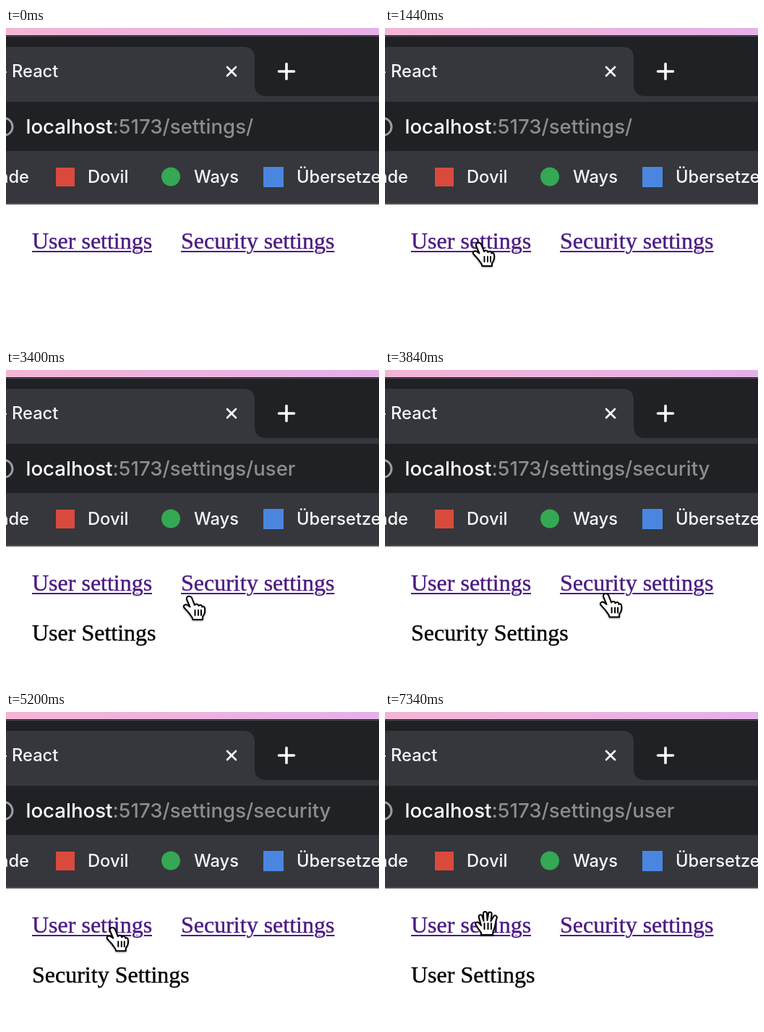
An HTML page that plays this animation: 516x434 px, repeating every 7400 ms.

```html
<!DOCTYPE html>
<html lang="de">
<head>
<meta charset="utf-8">
<title>Settings</title>
<style>
  html, body { margin: 0; width: 100%; height: 100%; overflow: hidden; background: #fff; }
  svg { display: block; }
  .ui { font: 500 23.7px Inter, sans-serif; fill: #f4f5f6; }
  .url { font-size: 27.6px; fill: #fff; }
  .page { font: 32px "Liberation Serif", serif; stroke: #000; stroke-width: .4; }
  .halo { fill: #fff; stroke: #fff; stroke-width: 4; }
  .link { fill: #4b1b82; stroke: #4b1b82; }
  .bar { fill: #35373c; }
  .dark { fill: #202124; }
  .hand { fill: #fff; stroke: #000; stroke-width: 2; stroke-linejoin: round; stroke-linecap: round; }
  #cursor { filter: drop-shadow(0 1px 1px #0006); }
</style>
</head>
<body>
<svg width="516" height="434" viewBox="0 0 516 434">
  <defs>
    <linearGradient id="sky">
      <stop stop-color="#f4b5d5"/>
      <stop offset="1" stop-color="#e4b1e8"/>
    </linearGradient>
    <g id="links">
      <text x="36" y="305">User settings</text>
      <text x="242" y="305">Security settings</text>
    </g>
  </defs>

  <!-- browser window -->
  <rect width="516" height="10" fill="url(#sky)"/>
  <rect class="dark" y="10" width="516" height="160"/>
  <rect y="10" width="516" height="1" fill="#1a1218"/>
  <rect y="11" width="516" height="1" fill="#56545a"/>
  <path class="bar" d="M0 26H328Q344 26 344 42V78Q344 94 360 94H516V102H0Z"/>
  <rect class="bar" y="170" width="516" height="73"/>
  <rect y="242" width="516" height="2" fill="#5c5454"/>
  <path d="M306 54l12 12m0-12l-12 12" stroke="#fff" stroke-width="2.6" stroke-linecap="round"/>
  <path d="M377.5 60h21M388 49.5v21" stroke="#fff" stroke-width="3.6" stroke-linecap="round"/>
  <circle cx="-3" cy="136.5" r="12" fill="none" stroke="#9a9da1" stroke-width="3"/>

  <g class="ui">
    <rect y="60" width="1" height="2"/>
    <text x="8" y="68">React</text>
    <text class="url" x="27.5" y="146">localhost<tspan fill="#8b8d91">:5173/settings/<tspan id="route"></tspan></tspan></text>
    <text x="32" y="214" text-anchor="end">nde</text>
    <rect x="69" y="193" width="26" height="26" fill="#d94a3d"/>
    <text x="113" y="214">Dovil</text>
    <circle cx="228" cy="205.5" r="13" fill="#34a853"/>
    <text x="260" y="214">Ways</text>
    <rect x="356" y="192" width="28" height="28" fill="#4a86e0"/>
    <text x="402" y="214">Übersetzen</text>
  </g>

  <!-- page: the halo opens the underline around descenders -->
  <path d="M36 309H202M242 309H454.5" stroke="#4b1b82" stroke-width="2"/>
  <g class="page">
    <use href="#links" class="halo"/>
    <use href="#links" class="link"/>
    <text id="heading" x="36" y="374"></text>
  </g>

  <!-- cursors, each with its hot spot at the origin -->
  <g id="cursor">
    <path id="arrow" d="M0 0V29L7 23L12 34L17 32L12 21H21Z" stroke="#fff" stroke-width="2"/>
    <g id="pointer" class="hand">
      <path d="M-4 4C-5-1 1.5-1.5 3 2L7 12C8 10 12 10 12.5 13C14 11 17 11 17.5 14.5C19 13 21 14 21 17C22 22 20.500 25 18 28V32H4.500L3.500 29C1 25-3 20-7.500 15.500C-9.500 12.500-6 10-3 12L.5 14.500Z"/>
      <path d="M7.500 19v7m4.500-7v7m4-7v7" fill="none"/>
    </g>
    <g id="palm" class="hand">
      <path d="M-8 16V13C-11 9-13 6-15.500 2C-17-1-13-3-10.500 0L-8 3L-11-8C-12-12-7.500-13-6.500-9.500L-4.500-3L-5-13C-5-17 0-17 0-13L.5-4L2-13C2.500-16.500 7-16 6.500-12.500L5.500-3L9-9C10.500-12 15-10.500 13.500-7C11 0 12 6 8.500 11L8 16Z"/>
      <path d="M-3.500 0v8m5-8v8m4.500-8v8" fill="none"/>
    </g>
  </g>
</svg>
<script>
const LOOP = 7400, ENTER = 520, GRAB = 7340;

// time, x, y of the cursor
const track = [
  [520, 160, 434], [1240, 130, 299], [1440, 130, 297], [2000, 130, 291],
  [2920, 130, 291], [3400, 254, 313], [3640, 298, 311], [4120, 311, 308],
  [4520, 311, 308], [4680, 314.5, 306.5], [4960, 225, 322], [5240, 144, 296],
  [5560, 139.5, 291], [7340, 139.5, 291], [7400, 139.5, 291]
];
const visits = [[0, ''], [2160, 'user'], [3720, 'security'], [5880, 'user']];
const linkSpans = [[36, 202], [242, 455]];

const el = id => document.getElementById(id);
const show = (id, on) => el(id).setAttribute('visibility', on ? 'visible' : 'hidden');

const slope = (i, k) => (track[i + 1][k] - track[i][k]) / (track[i + 1][0] - track[i][0]);

// Tangent that never overshoots: zero at turning points and rests
function tangent(i, k) {
  if (i === 0 || i === track.length - 1) return 0;
  const a = slope(i - 1, k), b = slope(i, k);
  return a * b > 0 ? 2 * a * b / (a + b) : 0;
}

function position(t, k) {
  const i = Math.max(0, track.findIndex(p => p[0] > t) - 1);
  const p = track[i], q = track[i + 1], span = q[0] - p[0];
  const u = Math.max(0, (t - p[0]) / span), v = 1 - u;
  return v * v * (1 + 2 * u) * p[k] + u * u * (3 - 2 * u) * q[k]
    + span * u * v * (v * tangent(i, k) - u * tangent(i + 1, k));
}

function draw(t) {
  const route = visits.filter(v => v[0] <= t).pop()[1];
  el('route').textContent = route;
  el('heading').textContent = route && route[0].toUpperCase() + route.slice(1) + ' Settings';

  const grabbing = t >= GRAB;
  const x = grabbing ? 141 : position(t, 1), y = grabbing ? 292 : position(t, 2);
  const onLink = y > 277 && y < 315 && linkSpans.some(([a, b]) => x >= a && x <= b);
  el('cursor').setAttribute('transform', `translate(${x} ${y})`);
  show('palm', grabbing);
  show('pointer', !grabbing && onLink);
  show('arrow', t >= ENTER && !grabbing && !onLink);
}

let start;
function frame(now) {
  start ??= now;
  draw((now - start) % LOOP);
  requestAnimationFrame(frame);
}
draw(0);
requestAnimationFrame(frame);
</script>
</body>
</html>
```
